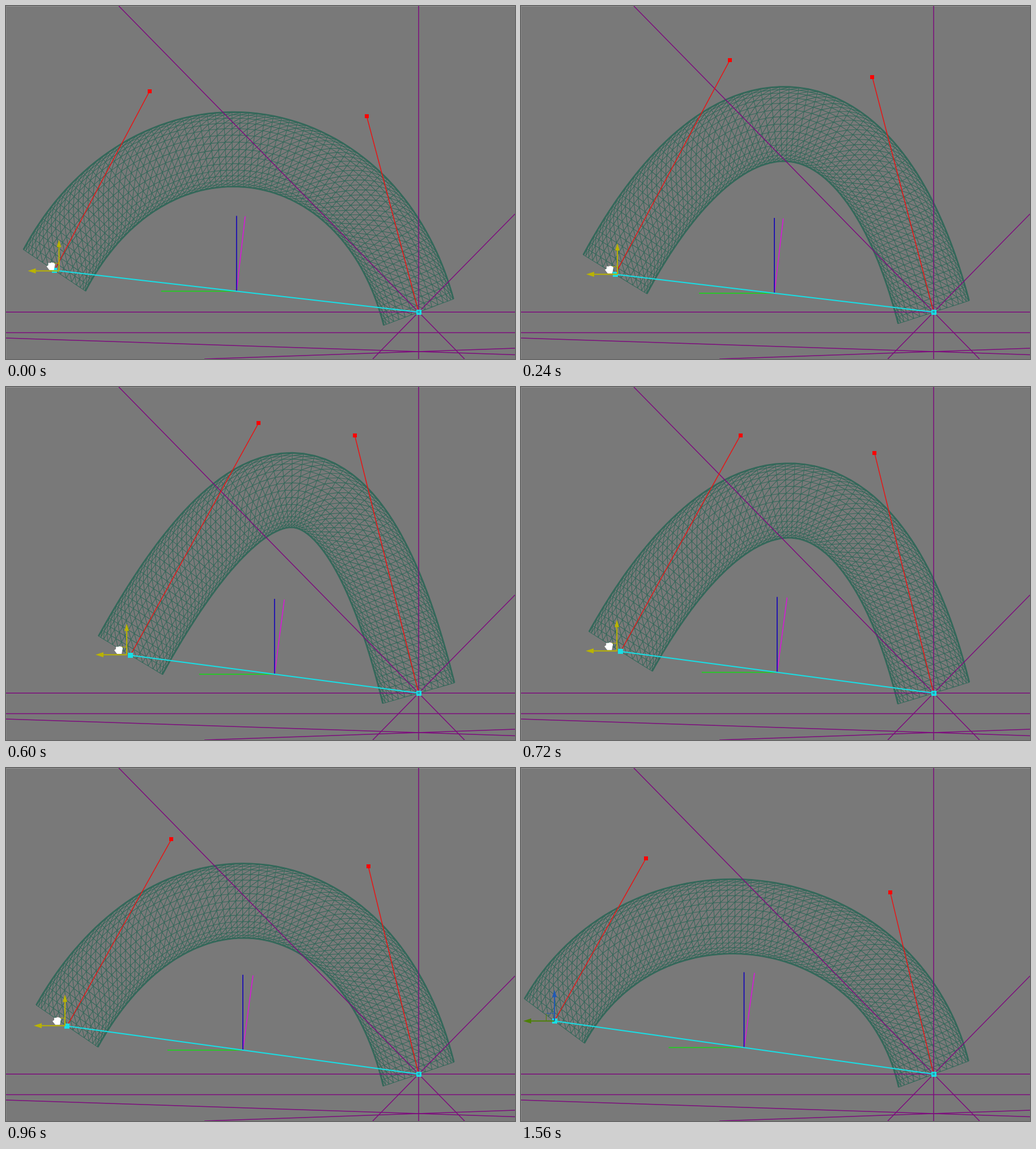
These frames come from a looping animation (898x623 px, 2210 ms). An HTML page with a canvas:

```html
<!DOCTYPE html>
<html lang="en">
<head>
<meta charset="utf-8">
<title>Spline tube</title>
<style>
html, body { margin: 0; width: 100%; height: 100%; overflow: hidden; background: #797979; }
canvas { display: block; }
</style>
</head>
<body>
<canvas id="stage" width="898" height="623"></canvas>
<script>
const ctx = document.getElementById("stage").getContext("2d");
const LOOP = 2210, STEP = 120, LAST = 13, RELEASE = 10;
const RADIUS = 66, RINGS = 72, ROWS = 16;
const END = [728, 540.3];
const SPLAY = 21.4 * Math.PI / 180;
const PURPLE = "#7d0b7d", CYAN = "#17dfe6", MESH = "#34685a";

// Dragged end of the spline: step, x, y
const dragPath = [[0, 85.5, 466.5], [1, 139, 473.5], [3, 193, 473.5],
  [5, 219.5, 473.5], [7, 132, 460], [RELEASE, 59, 446.5]];

const mix = (a, b, k) => a + (b - a) * k;
const shift = (p, x, y) => [p[0] + x, p[1] + y];
const polar = (p, angle, r) => shift(p, r * Math.sin(angle), -r * Math.cos(angle));

function anchorAt(step) {
  const s = Math.min(step, RELEASE);
  const i = dragPath.findIndex(key => key[0] >= s) || 1;
  const a = dragPath[i - 1], b = dragPath[i], k = (s - a[0]) / (b[0] - a[0]);
  return [mix(a[1], b[1], k), mix(a[2], b[2], k)];
}

// Handles lean inwards from the chord's normal and grow as the ends approach.
function splineFrom(anchor) {
  const dx = END[0] - anchor[0], dy = END[1] - anchor[1];
  const tilt = Math.atan2(dy, dx), chord = Math.hypot(dx, dy);
  const reach = 468 - 0.7625 * (chord - 513) - 0.00109 * (chord - 513) * (chord - 593);
  return {
    tilt,
    points: [anchor, polar(anchor, tilt + SPLAY, reach), polar(END, tilt - SPLAY, reach), END]
  };
}

function line(color, width, ...points) {
  ctx.strokeStyle = color;
  ctx.lineWidth = width;
  ctx.beginPath();
  points.forEach(p => ctx.lineTo(p[0], p[1]));
  ctx.stroke();
}

function shape(color, [x, y], points) {
  ctx.fillStyle = color;
  ctx.beginPath();
  points.forEach(p => ctx.lineTo(x + p[0], y + p[1]));
  ctx.closePath();
  ctx.fill();
}

function square(color, [x, y], size) {
  ctx.fillStyle = color;
  ctx.fillRect(Math.round(x - size / 2), Math.round(y - size / 2), size, size);
}

function bezier(points, t) {
  const u = 1 - t;
  const weights = [u * u * u, 3 * t * u * u, 3 * t * t * u, t * t * t];
  return [0, 1].map(c => weights.reduce((sum, w, i) => sum + w * points[i][c], 0));
}

// Curve parameters that split the curve into equal lengths.
function evenParameters(points, count) {
  const samples = 260, lengths = [0];
  let before = points[0];
  for (let i = 1; i <= samples; i++) {
    const p = bezier(points, i / samples);
    lengths.push(lengths[i - 1] + Math.hypot(p[0] - before[0], p[1] - before[1]));
    before = p;
  }
  const result = [];
  for (let n = 0, i = 0; n <= count; n++) {
    const goal = lengths[samples] * n / count;
    while (i < samples - 1 && lengths[i + 1] < goal) i++;
    result.push((i + (goal - lengths[i]) / (lengths[i + 1] - lengths[i])) / samples);
  }
  return result;
}

function tubeRings(points) {
  return evenParameters(points, RINGS).map(t => {
    const center = bezier(points, t);
    const a = bezier(points, Math.max(0, t - 0.1));
    const b = bezier(points, Math.min(1, t + 0.1));
    const normal = Math.atan2(b[1] - a[1], b[0] - a[0]);
    return Array.from({ length: ROWS + 1 }, (_, j) =>
      polar(center, normal, RADIUS * Math.cos(Math.PI * j / ROWS)));
  });
}

function drawTube(points) {
  const rings = tubeRings(points);
  const edge = (a, b) => { ctx.moveTo(a[0], a[1]); ctx.lineTo(b[0], b[1]); };
  ctx.strokeStyle = MESH;
  ctx.lineWidth = 1.1;
  ctx.beginPath();
  rings.forEach((ring, i) => {
    const next = rings[i + 1];
    ring.forEach((p, j) => {
      if (j) edge(ring[j - 1], p);
      if (next) edge(p, next[j]);
      if (next && j) edge(p, next[j - 1]);
    });
  });
  ctx.stroke();
  for (const j of [0, ROWS]) line(MESH, 2.2, ...rings.map(ring => ring[j]));
}

function drawGuides() {
  const [x, y] = END;
  const guide = (...points) => line(PURPLE, 1.5, ...points);
  guide([x, 0], [x, 623]);
  guide([199, 0], [x, y], [809, 623]);
  guide([898, 367], [x, y], [647, 623]);
  guide([0, y], [898, y]);
  guide([0, 576.4], [898, 576.4]);
  guide([0, 586], [898, 615.5]);
  guide([350, 623], [898, 604]);
}

function drawAxes(anchor, tilt) {
  const middle = [mix(anchor[0], END[0], 0.5), mix(anchor[1], END[1], 0.5)];
  line("#e010e0", 1.5, middle, polar(middle, tilt, 133));
  line("#1fd01f", 1.8, middle, shift(middle, -133, 0));
  line("#1405b8", 1.7, middle, shift(middle, 0, -133));
}

function drawGizmo(p, dragging) {
  const side = dragging ? "#b9b300" : "#4d8005";
  const up = dragging ? "#b9b300" : "#2059b5";
  const corner = shift(p, -14.5, -13.5);
  line(side, 1, shift(p, -14.5, 0), corner);
  line(up, 1, corner, shift(p, 0, -13.5));
  line(side, 2, p, shift(p, -44, 0));
  line(up, 2, p, shift(p, 0, -44));
  shape(side, p, [[-55, 0], [-41, -4.5], [-41, 4.5]]);
  shape(up, p, [[0, -55], [-4, -42], [4, -42]]);
}

function drawHand(p) {
  shape("#fff", p, [[-5, -6], [-1, -6], [1, -7], [5, -6], [7, -4], [5, 6.5],
    [-3, 6.5], [-8, 0], [-5, -2]]);
}

function drawPointer(p) {
  shape("#fff", p, [[0, 0], [0, 10], [2.4, 7.8], [4, 11], [5.8, 10.2], [4.4, 7], [7.6, 7]]);
}

function drawHandle(from, to) {
  line("#e81414", 1.5, from, to);
  square("#f00", to, 7);
}

function draw(step) {
  const anchor = anchorAt(step), gizmo = anchorAt(step + 0.15);
  const { points, tilt } = splineFrom(anchor);
  const dragging = step < RELEASE, since = step - RELEASE;
  ctx.fillStyle = "#797979";
  ctx.fillRect(0, 0, 898, 623);
  line("#929292", 1, [0, 0.5], [898, 0.5]);
  line("#868686", 1, [0.5, 0], [0.5, 623]);
  drawTube(points);
  drawGuides();
  drawAxes(anchor, tilt);
  line(CYAN, 1.9, anchor, END);
  drawHandle(anchor, points[1]);
  drawHandle(END, points[2]);
  square(CYAN, anchor, 9);
  square(CYAN, END, 9);
  square("#2b9fb5", END, 4);
  drawGizmo(gizmo, dragging);
  if (dragging) drawHand(shift(gizmo, -14, -8));
  else if (step < LAST) drawPointer([274 + 71 * since, 471 - 179 * since]);
}

let shown = -1;
const start = performance.now();
function tick() {
  const time = (performance.now() - start) % LOOP;
  const step = Math.min(LAST, Math.floor(time / STEP));
  if (step !== shown) draw(shown = step);
  requestAnimationFrame(tick);
}
tick();
</script>
</body>
</html>
```
